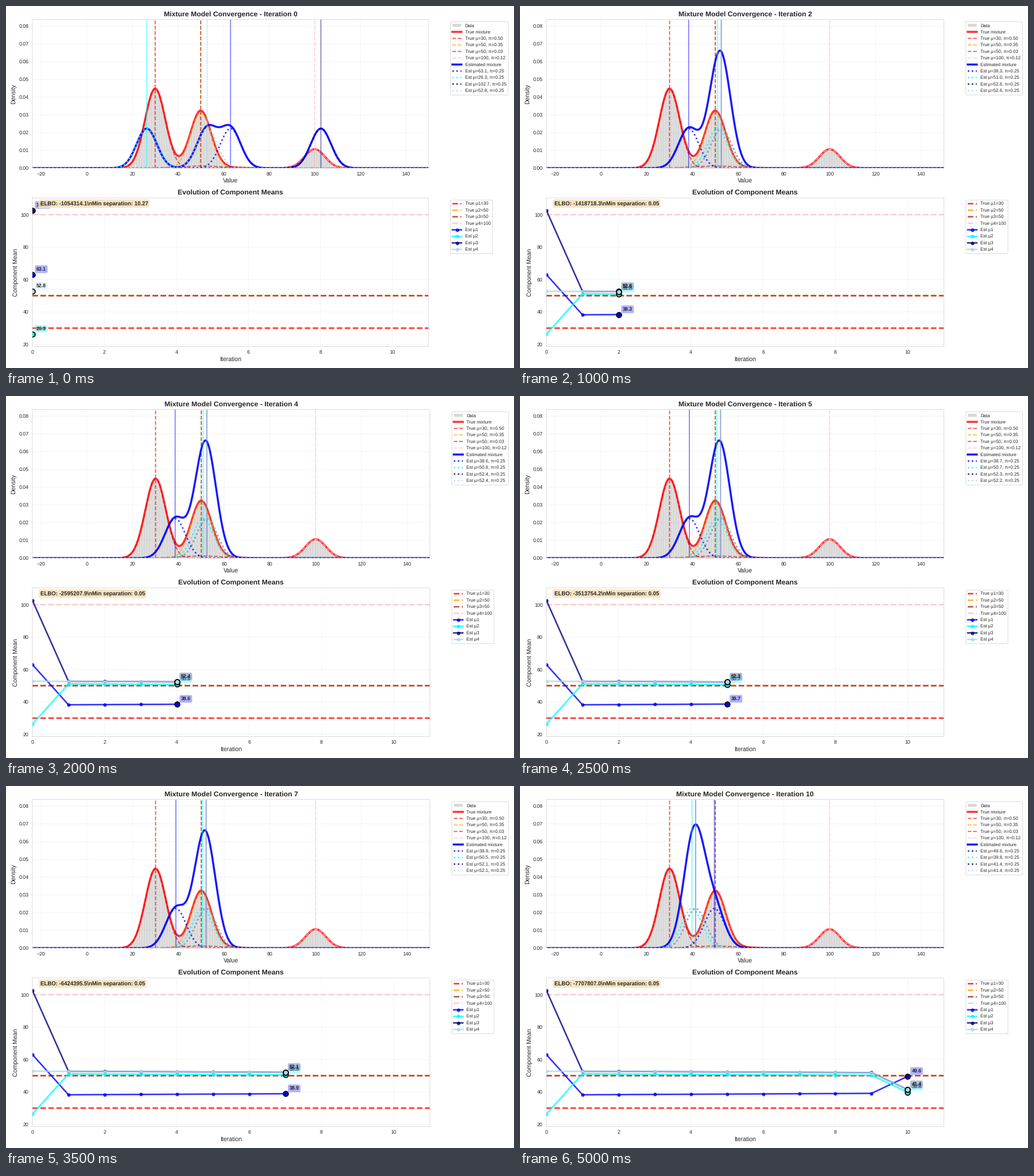
Write a matplotlib script that moves like this. It is 885 by 632 pixels and loops after 5500 ms.

```python
import numpy as np
import matplotlib.pyplot as plt
from matplotlib.animation import FuncAnimation

W, H, DPI = 885, 632, 63.2
INK = "0.15"

plt.rcParams.update({
    "font.family": "Liberation Sans",
    "text.hinting": "none",
    "text.color": INK,
    "path.snap": False,
    "axes.labelcolor": INK,
    "axes.edgecolor": "0.8",
    "axes.axisbelow": True,
    "grid.color": "0.8",
    "patch.edgecolor": "w",
    "patch.force_edgecolor": True,
})
for axis in ("xtick", "ytick"):
    plt.rcParams.update({
        f"{axis}.color": INK,
        f"{axis}.major.size": 0,
        f"{axis}.major.pad": 7,
    })

# True mixture: mean, weight, standard deviation, colour
TRUE = [
    (30, 0.50, 20 ** 0.5, "red"),
    (50, 0.35, 20 ** 0.5, "orange"),
    (50, 0.03, 10.0, "brown"),
    (100, 0.12, 20 ** 0.5, "pink"),
]
EST_COLORS = ["blue", "cyan", "navy", "lightblue"]
EST_WEIGHT, EST_SD = 0.25, 20 ** 0.5

STEPS = 11
XLIM = (-23.87, 149.9)
YMAX = 0.0837
X = np.linspace(*XLIM, 1000)

ELBO = [-1054314.1, -1050069.4, -1418718.3, -1916766.6, -2595207.9, -3513754.2,
        -4751190.4, -6424395.5, -7102418.6, -7852012.2, -7707807.0]


def normal(mean, weight, sd):
    z = (X - mean) / sd
    return weight * np.exp(-z * z / 2) / (sd * np.sqrt(2 * np.pi))


def estimate_path():
    """Estimated means per iteration: a jump, a slow drift, a swap."""
    j = np.arange(STEPS - 2)
    low = 52.66 - 0.105 * j + 0.0006 * j ** 2
    drift = np.column_stack([38.24 + 0.108 * j, 51.11 - 0.1 * j, low + 0.05, low])
    return np.vstack([[63.07, 26.30, 102.70, 52.80], drift,
                      [49.60, 39.80, 41.42, 41.37]])


def sample_data(n=100_000):
    rng = np.random.default_rng(42)
    return np.concatenate([rng.normal(m, s, int(n * w)) for m, w, s, _ in TRUE])


MEANS = estimate_path()
DATA = sample_data()
TRUE_PDFS = [normal(m, w, s) for m, w, s, _ in TRUE]

fig = plt.figure(figsize=((W + 0.001) / DPI, (H + 0.001) / DPI), dpi=DPI,
                 facecolor="white")
top, low = fig.add_subplot(211), fig.add_subplot(212)


def place(ax, left, right, upper, lower):
    ax.set_position([left / W, 1 - lower / H, (right - left) / W, (lower - upper) / H])


def finish(ax, title, xlabel, ylabel):
    ax.set_title(title, fontsize=14, fontweight="bold")
    ax.set_xlabel(xlabel, fontsize=12)
    ax.set_ylabel(ylabel, fontsize=12)
    ax.grid(True, alpha=0.3)
    ax.legend(bbox_to_anchor=(1.05, 1), loc="upper left", fontsize=9)


def draw_density(ax, k):
    ax.hist(DATA, bins=100, density=True, color="gray", alpha=0.3, label="Data")
    ax.plot(X, sum(TRUE_PDFS), color="red", lw=4, alpha=0.8, label="True mixture")
    for (mean, weight, _, color), pdf in zip(TRUE, TRUE_PDFS):
        style = dict(color=color, ls="--", lw=2, alpha=0.7)
        ax.plot(X, pdf, label=f"True μ={mean}, π={weight:.2f}", **style)
        ax.axvline(mean, **style)

    pdfs = [normal(m, EST_WEIGHT, EST_SD) for m in MEANS[k]]
    ax.plot(X, sum(pdfs), color="blue", lw=4, alpha=0.9, label="Estimated mixture")
    for mean, pdf, color in zip(MEANS[k], pdfs, EST_COLORS):
        ax.plot(X, pdf, color=color, ls=":", lw=3, alpha=0.8,
                label=f"Est μ={mean:.1f}, π={EST_WEIGHT:.2f}")
        ax.axvline(mean, color=color, lw=2, alpha=0.5)

    ax.set_xlim(*XLIM)
    ax.set_ylim(0, YMAX)
    finish(ax, f"Mixture Model Convergence - Iteration {k}", "Value", "Density")


def draw_means(ax, k):
    for i, (mean, _, _, color) in enumerate(TRUE, 1):
        ax.axhline(mean, color=color, ls="--", lw=3, alpha=0.8,
                   label=f"True μ{i}={mean}")

    for i, color in enumerate(EST_COLORS):
        now = MEANS[k, i]
        ax.plot(np.arange(k + 1), MEANS[:k + 1, i], "o-", color=color, lw=3,
                ms=6, alpha=0.8, label=f"Est μ{i + 1}")
        ax.scatter([k], [now], s=100, color=color, edgecolor="black",
                   linewidth=2, zorder=5)
        ax.annotate(f"{now:.1f}", (k, now), xytext=(8, 8),
                    textcoords="offset points", fontsize=10, fontweight="bold",
                    bbox=dict(boxstyle="round,pad=0.3", facecolor=color, alpha=0.3))

    gap = np.diff(np.sort(MEANS[k])).min()
    ax.text(0.02, 0.98, f"ELBO: {ELBO[k]:.1f}\\nMin separation: {gap:.2f}",
            transform=ax.transAxes, va="top", fontsize=11, fontweight="bold",
            bbox=dict(boxstyle="round,pad=0.3", facecolor="wheat", alpha=0.8))

    pad = 0.1 * np.ptp(MEANS)
    ax.set_xlim(0, STEPS)
    ax.set_ylim(MEANS.min() - pad, MEANS.max() + pad)
    finish(ax, "Evolution of Component Means", "Iteration", "Component Mean")


def update(k):
    # The wider legend of the first step narrows both plots
    right = 736 if k == 0 else 738.3
    top.clear()
    low.clear()
    place(top, 45.9, right, 23.6, 283.1)
    place(low, 45.9, right, 335, 594.5)
    draw_density(top, k)
    draw_means(low, k)
    return []


anim = FuncAnimation(fig, update, frames=STEPS, interval=500,
                     init_func=lambda: update(0), repeat=True, repeat_delay=0)
plt.show()
```
